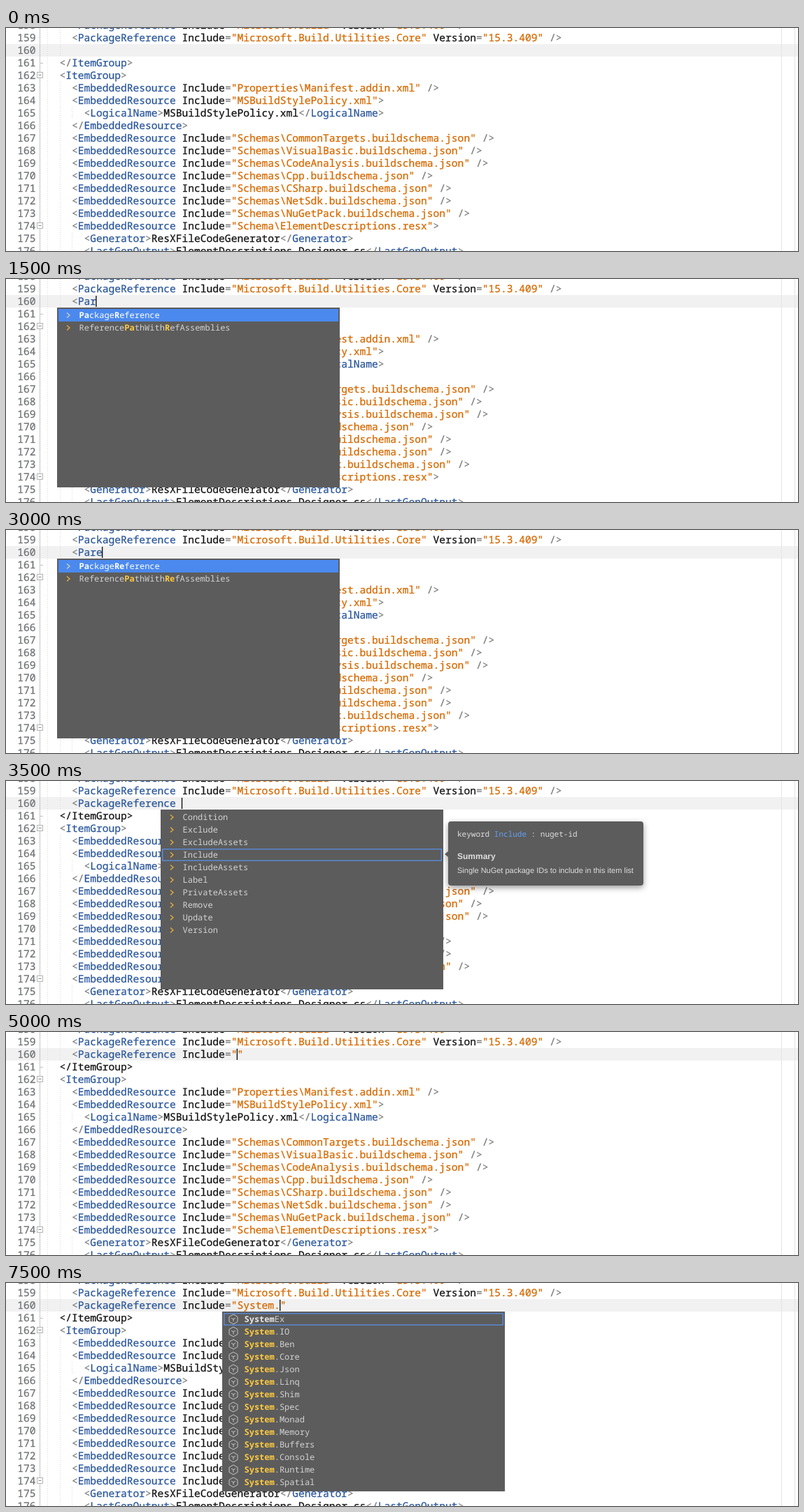
An HTML page that plays this animation: 1132x320 px, repeating every 8 s.

```html
<!DOCTYPE html>
<html lang="en">
<head>
<meta charset="utf-8">
<title>XML completion</title>
<style>
html, body { margin: 0; width: 100%; height: 100%; overflow: hidden; background: #fff; }
svg { display: block; }
text { white-space: pre; text-rendering: geometricPrecision; fill: currentColor; }
tspan { fill: currentColor; }
.code { font: 14.6px "Noto Sans Mono", "DejaVu Sans Mono", monospace; color: #111; }
.code, .code tspan { stroke: currentColor; stroke-width: .28; }
.tag { color: #2b579b; }
.punct { color: #7c7e7b; }
.value { color: #d56900; }
.num { color: #6f7274; text-anchor: end; }
.item { font: 12px "Noto Sans Mono", "DejaVu Sans Mono", monospace; color: #d2d2d2; }
.hit { font-weight: 700; color: #ffca3e; }
.picked, .picked .hit { color: #fff; }
.outlined .hit { color: #e8e8e8; }
.tip { font: 11px "Liberation Sans", Arial, sans-serif; color: #dedede; }
.mono { font: 11px "Noto Sans Mono", "DejaVu Sans Mono", monospace; }
.link { color: #62a0f2; }
.ital { font-style: italic; }
.head { font-size: 12px; font-weight: 700; }
.status { font: 12.8px "Liberation Sans", Arial, sans-serif; color: #d8d8d8; }
.line { fill: none; stroke: #c8c8c8; }
</style>
</head>
<body>
<svg id="stage" width="1132" height="320" viewBox="0 0 1132 320">
  <defs>
    <filter id="shadow" x="-10%" y="-20%" width="120%" height="150%">
      <feDropShadow dx="0" dy="3" stdDeviation="4" flood-opacity=".4"/>
    </filter>
  </defs>
  <g id="editor"></g>
  <g id="typed"></g>
  <g id="overlay"></g>
</svg>
<script>
const LEFT = 58.9, COL = 8.76, ROW = 18, FIRST = 158, STEP = 500;
const BASE = 14; // baseline below the top of a code row
const POPUP = { y: 41, w: 404, h: 258 };
const byId = id => document.getElementById(id);
const esc = s => s.replace(/&/g, '&amp;').replace(/</g, '&lt;').replace(/>/g, '&gt;');
const span = (cls, s) => `<tspan class="${cls}">${esc(s)}</tspan>`;
const text = (cls, x, y, body) => `<text class="${cls}" x="${x}" y="${y}">${body}</text>`;
const rect = (x, y, w, h, fill, extra = '') =>
  `<rect x="${x}" y="${y}" width="${w}" height="${h}" fill="${fill}" ${extra}/>`;
const path = (d, stroke, extra = '') => `<path d="${d}" fill="none" stroke="${stroke}" ${extra}/>`;
const rowTop = n => (n - FIRST) * ROW - 13;

function highlight(src) {
  let inTag = false, nameNext = false;
  return src.replace(/<\/?|\/?>|"[^"]*"?|=|[^\s<>="\/]+|\s+/g, token => {
    if (token[0] === '<') { inTag = nameNext = true; return span('punct', token); }
    if (token.endsWith('>')) { inTag = false; return span('punct', token); }
    if (inTag && token === '=') return span('punct', token);
    if (inTag && token[0] === '"') return span('value', token);
    if (nameNext) { nameNext = false; return span('tag', token); }
    return esc(token);
  });
}
const codeLine = (n, body, indent) => text('code', LEFT + indent * COL, rowTop(n) + BASE, body);

const resource = name => `    <EmbeddedResource Include="${name}" />`;
const schema = name => resource(`Schemas\\${name}.buildschema.json`);
const pkg = name => `    <PackageReference Include="${name}" Version="15.3.409" />`;
const source = [
  pkg('Microsoft.Build'),
  pkg('Microsoft.Build.Utilities.Core'),
  '', '',
  '  <ItemGroup>',
  resource('Properties\\Manifest.addin.xml'),
  '    <EmbeddedResource Include="MSBuildStylePolicy.xml">',
  '      <LogicalName>MSBuildStylePolicy.xml</LogicalName>',
  '    </EmbeddedResource>',
  ...['CommonTargets', 'VisualBasic', 'CodeAnalysis', 'Cpp', 'CSharp', 'NetSdk', 'NuGetPack'].map(schema),
  '    <EmbeddedResource Include="Schema\\ElementDescriptions.resx">',
  '      <Generator>ResXFileCodeGenerator</Generator>',
  '      <LastGenOutput>ElementDescriptions.Designer.cs</LastGenOutput>'
];

function drawEditor() {
  const dots = 'stroke-dasharray="1 2"';
  let out = rect(0, 23, 1132, ROW, '#f1f1f1');
  out += path('M48.5 0V320', '#c4c4c4') + path('M1108.5 0V320M1127.5 0V320', '#e4e4e4');
  out += path('M59.5 0V320M77.5 0V41M77.5 77V320M94.5 113V131M94.5 293V320', '#d9d9d9', dots);
  out += path('M48.5 50.5H53', '#c4c4c4');
  source.forEach((line, i) => {
    const n = FIRST + i, indent = line.search(/\S|$/);
    out += text('code num', 42.5, rowTop(n) + BASE, n) + codeLine(n, highlight(line.trim()), indent);
  });
  for (const n of [162, 174]) {
    const y = rowTop(n) + 4.5;
    out += rect(44.5, y, 8, 8, '#fff', 'stroke="#b4b4b4"') + path(`M46.5 ${y + 4}h4`, '#888');
  }
  return out;
}

// Emphasise each part where it next occurs in the name.
function mark(name, parts) {
  let at = 0, out = '';
  for (const part of parts) {
    const i = name.indexOf(part, at);
    if (i < 0) break;
    out += esc(name.slice(at, i)) + span('hit', part);
    at = i + part.length;
  }
  return out + esc(name.slice(at));
}

const chevron = (x, y, picked) =>
  path(`M${x + 14} ${y - 3.5}l4 3.5l-4 3.5`, picked ? '#d9d2b4' : '#edb23c', 'stroke-width="1.2"');
const hexagon = (x, y) =>
  path(`M${x + 16} ${y - 7}l6 3.5v7l-6 3.5l-6 -3.5v-7zm-3 5.3l3 1.7l3 -1.7m-3 1.7v3.5`, '#c6c6c6');

function atom(x, y) {
  const ring = a => `<ellipse class="line" rx="6.5" ry="2.6" transform="translate(${x} ${y}) rotate(${a})"/>`;
  return [0, 60, 120].map(ring).join('') + `<circle cx="${x}" cy="${y}" r="1.4" fill="#ddd"/>`;
}

function drawPopup({ x, names, hits = [], pick = 0, outline, icon = chevron, busy, thumb }) {
  let out = rect(x, POPUP.y, POPUP.w, POPUP.h, '#5c5c5c');
  const top = busy ? 65 : 43;
  if (busy) out += rect(x + 2, 43, 400, 22, '#606060') + atom(x + 12.5, 54) +
    text('status', x + 24, 59, 'Gathering class information...');
  names.slice(0, Math.floor((299 - top) / ROW)).forEach((name, i) => {
    const y = top + i * ROW, on = i === pick;
    if (on) out += outline
      ? rect(x + 2.75, y + .75, 398.5, 16.5, 'none', 'stroke="#5a88d2" stroke-width="1.5"')
      : rect(x + 2, y, 400, ROW, '#4b89ee');
    const cls = on ? (outline ? ' outlined' : ' picked') : '';
    out += icon(x, y + 9, on && !outline) + text('item' + cls, x + 31.5, y + 13, mark(name, hits));
  });
  if (thumb) out += rect(x + 393, 67, 7, 29, '#292929', 'rx="3"');
  return out;
}

function bubble(x, y, w, h, tipY) {
  return `<g filter="url(#shadow)" fill="#5b5b5b">${rect(x, y, w, h, '#5b5b5b', 'rx="4"')}` +
    `<path d="M${x + 1} ${tipY - 5}l-6 5l6 5z"/></g>`;
}
function itemTip() {
  const seen = (y, file) => text('tip ital', 497, y, span('link', '$(MSBuildBinPath)') + file);
  return bubble(484.5, 41, 329, 93, 68) +
    text('tip mono', 497, 63.5, 'item ' + span('link', 'ReferencePathWithRefAssemblies')) +
    text('tip', 497, 94.5, 'Seen in:') +
    seen(105.5, '/Roslyn/Microsoft.CSharp.Core.targets') +
    seen(116.5, '/Microsoft.Common.CurrentVersion.targets');
}
const includeTip = (y, tipY) => bubble(632, y, 279, 92, tipY) +
  text('tip mono', 645, y + 22, 'keyword ' + span('link', 'Include') + ' : nuget-id') +
  text('tip head', 645, y + 54, 'Summary') +
  text('tip', 645, y + 73.5, 'Single NuGet package IDs to include in this item list');

const attributes = ['Condition', 'Exclude', 'ExcludeAssets', 'Include', 'IncludeAssets', 'Label',
  'PrivateAssets', 'Remove', 'Update', 'Version'];
const packages = ['SystemEx', ...['IO', 'Ben', 'Core', 'Json', 'Linq', 'Shim', 'Spec', 'Monad', 'Memory',
  'Buffers', 'Console', 'Runtime', 'Spatial'].map(s => 'System.' + s)];

const elementList = (hits, pick = 0) =>
  ({ x: 73, names: ['PackageReference', 'ReferencePathWithRefAssemblies'], hits, pick });
const includeList = hit => ({ x: 221, names: ['Include', 'IncludeAssets'], hits: [hit] });
const packageList = (hit, busy) =>
  ({ x: 309, names: packages, hits: [hit], outline: true, icon: hexagon, busy, thumb: busy });

const REF = '<PackageReference ';
const quoted = s => ({ before: `${REF}Include="${s}`, after: '"', caret: true });
const steps = [
  { before: '' },
  { before: '<P', caret: true, list: elementList(['P']) },
  { before: '<Pa', caret: true, list: elementList(['Pa']) },
  { before: '<Par', caret: true, list: elementList(['Pa', 'R']) },
  { before: '<Pare', caret: true, list: elementList(['Pa', 'Re']) },
  { before: '<Pare', caret: true, list: elementList(['Pa', 'Re'], 1), tip: itemTip() },
  { before: '<Pare', caret: true, list: elementList(['Pa', 'Re']) },
  { before: REF, caret: true, list: { x: 221, names: attributes, pick: 3, outline: true }, tip: includeTip(58, 105) },
  { before: REF + 'I', list: includeList('I') },
  { before: REF + 'In', list: includeList('In'), tip: includeTip(41, 52) },
  quoted(''),
  { ...quoted('S'), list: packageList('S', true) },
  { ...quoted('Syst'), list: packageList('Syst', true) },
  { ...quoted('Syste'), list: packageList('Syste', true) },
  { ...quoted('System'), list: packageList('System', true) },
  { ...quoted('System.'), list: packageList('System', false) }
];

function drawStep({ before, after = '', caret, list, tip = '' }, index) {
  const closing = index < 7 ? highlight('</ItemGroup>') : esc('</ItemGroup>');
  let typed = codeLine(160, highlight(before + after), 4) + codeLine(161, closing, 2);
  if (caret) typed += rect(LEFT + (4 + before.length) * COL - .8, 24, 1.4, 16, '#111');
  byId('typed').innerHTML = typed;
  byId('overlay').innerHTML = (list ? drawPopup(list) : '') + tip;
}

byId('editor').innerHTML = drawEditor();
const start = performance.now();
let shown = -1;
function tick() {
  const index = Math.floor((performance.now() - start) / STEP) % steps.length;
  if (index !== shown) drawStep(steps[shown = index], index);
  requestAnimationFrame(tick);
}
tick();
</script>
</body>
</html>
```
